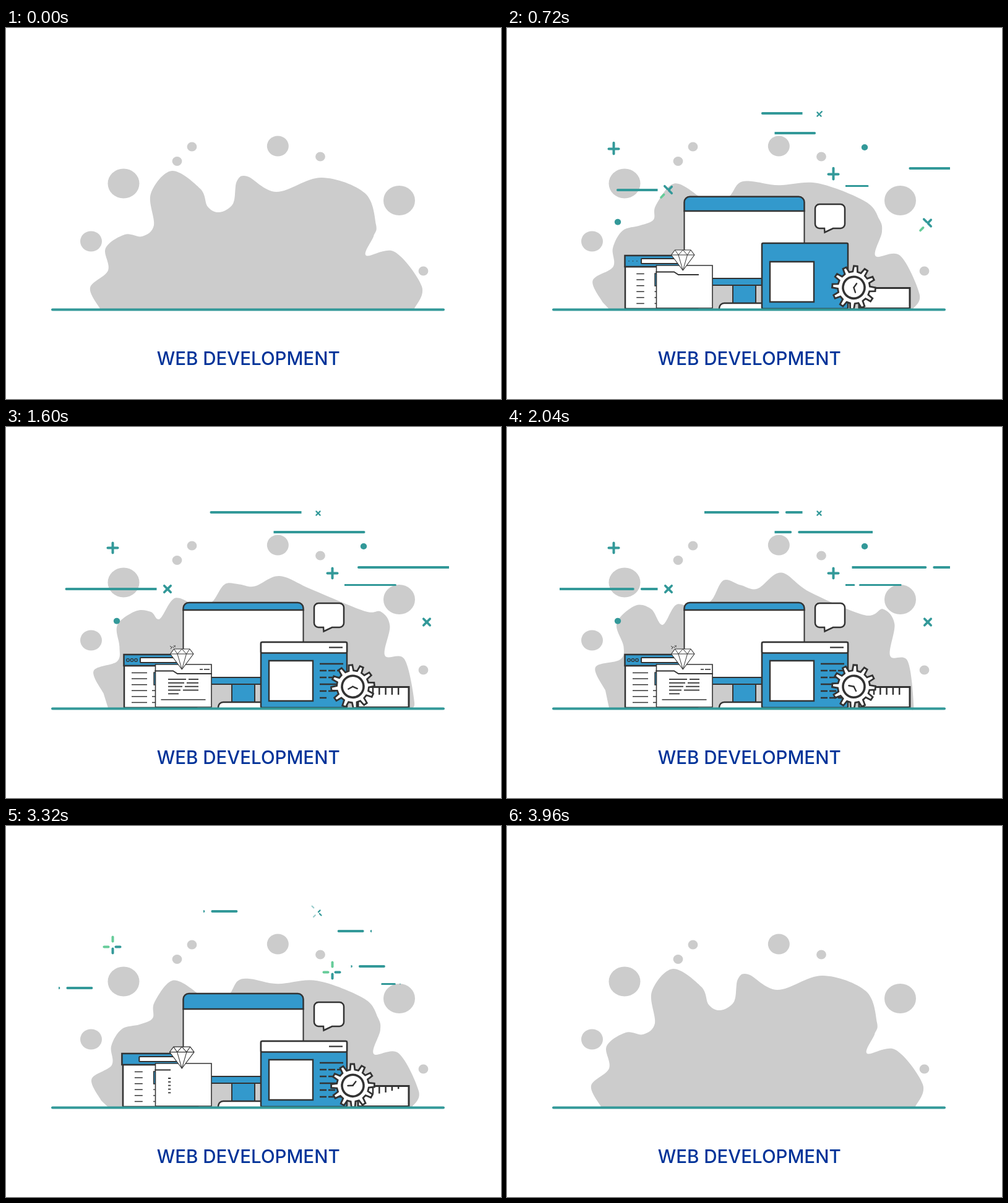
Animation of 800 by 600 pixels, one loop 4 s. Source, as an HTML page with a canvas:

```html
<!DOCTYPE html>
<html lang="en">
<head>
<meta charset="utf-8">
<title>Web development</title>
<style>
  html, body { margin: 0; width: 100%; height: 100%; overflow: hidden; background: #fff; }
  canvas, svg { position: absolute; left: 0; top: 0; display: block; }
  text { font: 500 29.5px Inter, Arial, sans-serif; fill: #039; text-anchor: middle; }
</style>
</head>
<body>
<canvas id="stage" width="800" height="600"></canvas>
<svg width="800" height="600"><text x="391.7" y="544.5">WEB DEVELOPMENT</text></svg>
<script>
const LOOP = 4000, STEP = 40, GROUND = 454.5;
const GRAY = '#ccc', BLUE = '#39c', DARK = '#333', TEAL = '#399', WHITE = '#fff';
const ctx = document.getElementById('stage').getContext('2d');
let t = 0;

// Timing: each part grows after its start and shrinks the same way before its end.
const clamp = u => Math.max(0, Math.min(1, u));
const mix = (a, b, u) => a + (b - a) * u;
const life = (start, end, time = 300) => clamp(Math.min(t - start, end - t) / time);
const pop = (start, end, spring = 1.7) => {
  const v = life(start, end) - 1;
  return 1 + (spring + 1) * v ** 3 + spring * v * v;
};
const reveal = (start, end, time = 200) => {
  const u = life(start, end, time);
  return u * u * (3 - 2 * u);
};

function placed(x, y, sx, sy, degrees, draw) {
  if (sx <= 0.01 || sy <= 0.01) return;
  ctx.save();
  ctx.translate(x, y);
  ctx.rotate(degrees * Math.PI / 180);
  ctx.scale(sx, sy);
  ctx.translate(-x, -y);
  draw();
  ctx.restore();
}

function clipped(x, y, w, h, draw) {
  ctx.save();
  ctx.beginPath();
  ctx.rect(x, y, w, h);
  ctx.clip();
  draw();
  ctx.restore();
}

const aboveGround = draw => clipped(0, 0, 800, GROUND, draw);

function paint(fill, width, stroke = DARK) {
  if (fill) { ctx.fillStyle = fill; ctx.fill(); }
  if (width) { ctx.strokeStyle = stroke; ctx.lineWidth = width; ctx.stroke(); }
}

function box(x, y, w, h, r, fill, width = 2.5) {
  if (h <= 0) return;
  ctx.beginPath();
  ctx.roundRect(x, y, w, h, r);
  paint(fill, width);
}

function oval(x, y, r, fill, width, squash = 1) {
  ctx.beginPath();
  ctx.ellipse(x, y, r, r * squash, 0, 0, 7);
  paint(fill, width);
}

function poly(points, fill, width, close = true) {
  ctx.beginPath();
  points.forEach(([x, y]) => ctx.lineTo(x, y));
  if (close) ctx.closePath();
  paint(fill, width);
}

function line(x1, y1, x2, y2, width, color = DARK, cap = 'butt') {
  ctx.lineCap = cap;
  ctx.beginPath();
  ctx.moveTo(x1, y1);
  ctx.lineTo(x2, y2);
  paint(null, width, color);
}

// Key points of the outline: x, y at rest, then x, y at full swell.
const SPLASH = [
  [152, 454, 159, 425], [136, 420, 143, 388], [165, 392, 183, 376], [161, 356, 189, 355],
  [192, 334, 177, 317], [220, 337, 207, 288], [239, 319, 233, 294], [234, 268, 252, 321],
  [268, 231, 275, 288], [314, 260, 310, 300], [326, 289, 320, 290], [345, 298, 333, 276],
  [367, 284, 350, 247], [373, 248, 378, 256], [390, 240, 405, 262], [437, 265, 443, 235],
  [510, 242, 488, 267], [580, 267, 578, 305], [598, 318, 608, 294], [594, 337, 627, 318],
  [582, 368, 620, 370], [628, 362, 648, 379], [672, 418, 657, 452], [660, 454, 650, 454]
];

function drawSplash() {
  const swell = t < 2000 ? t / 2000 : clamp((3960 - t) / 1960);
  const points = SPLASH.map(([ax, ay, bx, by]) => [mix(ax, bx, swell), mix(ay, by, swell)]);
  const pick = i => points[Math.max(0, Math.min(points.length - 1, i))];
  ctx.beginPath();
  ctx.moveTo(165, GROUND);
  ctx.lineTo(...points[0]);
  for (let i = 0; i < points.length - 1; i++) {
    const [a, b, c, d] = [pick(i - 1), pick(i), pick(i + 1), pick(i + 2)];
    ctx.bezierCurveTo(b[0] + (c[0] - a[0]) / 6, b[1] + (c[1] - a[1]) / 6,
      c[0] - (d[0] - b[0]) / 6, c[1] - (d[1] - b[1]) / 6, c[0], c[1]);
  }
  paint(GRAY);
  const bubbles = (r, ...centers) => centers.forEach(([x, y]) => oval(x, y, r, GRAY, 0, .94));
  bubbles(25.5, [190, 251.5], [635.5, 279]);
  bubbles(17.5, [137.5, 345], [439.3, 191]);
  bubbles(7.9, [276.5, 215.5], [300.5, 192], [508, 208], [674.5, 393]);
}

// Two dashes travel away from the anchor through a fixed window.
function streak(x, y, dir, scale = 1) {
  const span = 158.5 * scale, head = .0925 * t;
  const dash = (from, to) => {
    const a = (head - from) * scale - 2, b = (head - to) * scale + 2;
    if (a > 0) line(x + dir * a, y, x + dir * b, y, 4 * Math.sqrt(scale), TEAL, 'round');
  };
  clipped(dir > 0 ? x : x - span, y - 5, span, 10, () => {
    dash(0, 151);
    dash(161, 204);
  });
}

const armColor = d => d < 6 ? TEAL : d < 11 ? '#6c9' : d < 28 ? '#9cc' : '#cff';

// Four arms fly in one by one, rest as a cross, then part again.
function cross(x, y, size, turn, order, { first, speed, last, lag, exitSpeed }) {
  order.forEach((rank, i) => {
    const d = Math.max(0, (first + 110 * rank - t) * speed, (t - last - lag * rank) * exitSpeed);
    if (t < 100 || d > 46) return;
    placed(x, y, size, size, turn + i * 90, () =>
      line(x, y - d - 1, x, y - d - 8, 4, armColor(d), 'round'));
  });
}

function drawDecor() {
  streak(477.5, 138, -1);
  streak(432.5, 170, 1);
  streak(716, 227, -1);
  streak(243.5, 262, -1);
  streak(547, 255.5, 1, .57);

  const plus = { first: 430, speed: .045, last: 3300, lag: -20, exitSpeed: .1 };
  const saltire = { first: 520, speed: .08, last: 2620, lag: 40, exitSpeed: .08 };
  const spark = { first: 430, speed: .08, last: 3100, lag: 80, exitSpeed: .08 };
  cross(172.5, 195.5, 1, 0, [3, 1, 0, 2], plus);
  cross(527.5, 236.5, 1, 0, [3, 1, 0, 2], plus);
  cross(261, 262, .92, -45, [2, 1, 0, 3], saltire);
  cross(680, 315.5, .92, -45, [2, 1, 0, 3], saltire);
  cross(504.5, 139.5, .55, -45, [0, 3, 2, 1], spark);

  const r = 5.2 * pop(250, LOOP * 2, 17) * reveal(0, 2760, 160);
  const color = r > 9 ? '#9cc' : r > 4 ? TEAL : '#bbb';
  if (r > 0) {
    oval(578, 193, r, color, 0, .96);
    oval(179, 313.7, r, color, 0, .96);
  }
}

function drawSitePage() {
  const wide = Math.max(1, pop(200, 3570));
  const tall = reveal(80, 3640, 160);
  placed(249, 454, wide, tall, 0, () => {
    box(191, 386, 117, 68, 0, WHITE);
    placed(249, 377, Math.sqrt(wide), 1, 0, () => {
      box(190.5, 368, 118, 18, 0, BLUE);
      box(217, 373, 82, 8, 1, WHITE, 2);
    });
    box(239, 397, 22, 20, 0, BLUE, 1.5);
    const dot = 2.3 * reveal(700, 3240);
    for (let i = 0; dot > 0 && i < 3; i++) oval(197 + i * 6.5, 377, dot, null, 1.3);
    const half = 12.5 * reveal(600, 3440, 240);
    for (let i = 0; half > 0 && i < 6; i++) {
      const y = 397.5 + i * 9.6;
      line(215.5 - half, y, 215.5 + half, y, 1.5);
      if (i > 2) line(241 - half / 2.5, y, 241, y, 1.5);
    }
  });
}

function drawMonitor() {
  const foot = pop(200, 3800);
  aboveGround(() => {
    const top = mix(454, 413, reveal(80, 3800));
    box(365, top, 37, 445 - top, 0, BLUE, 2);
    placed(383, 454, foot, clamp(foot), 0, () => box(343, 445, 81, 20, 8, WHITE));
  });
  const screen = mix(414, 296, reveal(280, 3680, 150));
  const settle = reveal(360, 3560, 160);
  const chin = mix(Math.min(414, screen + 4), 405, settle);
  if (screen < 413) {
    box(286.5, screen, 194, chin - screen, 0, WHITE, 2);
    box(286.5, chin, 194, mix(413, 416, settle) - chin, 0, BLUE, 2);
  }
  const head = 12 * pop(560, 3440, 9);
  if (head > 1) box(286.5, 296 - head, 194, head, [9, 9, 0, 0], BLUE);
}

function drawFolder() {
  const size = pop(271, 3680);
  placed(286.5, 418.5, size, size, -45 * (1 - life(271, 3680)), () => {
    box(241.5, 384, 90.5, 69, 0, WHITE, 1.6);
    const tab = 94 * reveal(560, 3400, 240);
    if (tab > 0) {
      ctx.setLineDash([tab, 200]);
      poly([[241, 394.5], [270, 394.5], [277, 399], [332, 399]], null, 1.8, false);
      ctx.setLineDash([]);
    }
    if (life(800, 3200)) {
      line(313, 392, 318, 392, 1.6);
      line(320, 392, 329, 392, 1.6);
    }
    clipped(261, 404, 51 * reveal(800, 3360), 32, () => {
      for (let i = 0; i < 5; i++) {
        const y = 408 + i * 5.85, cut = 272 + (i * 37 + 19) % 20;
        line(262, y, cut, y, 1.8);
        if (i < 4) line(cut + 4, y, 311, y, 1.8);
      }
    });
    const rule = 72 * reveal(1040, 2860, 320);
    if (rule > 0) line(250.5, 441, 250.5 + rule, 441, 1.6);
  });
}

function drawDiamond() {
  const size = pop(200, 3570, 2.6);
  placed(284.3, 392, size, size, 0, () => {
    ctx.lineJoin = 'round';
    poly([[271.5, 359], [297, 359], [303, 367], [284.3, 392], [265.5, 367]], WHITE, 1.1);
    line(265.5, 367, 303, 367, 1);
    poly([[271.5, 359], [277, 367], [284.3, 359], [291.5, 367], [297, 359]], null, 1, false);
    poly([[277, 367], [284.3, 392], [291.5, 367]], null, 1, false);
    ctx.lineJoin = 'miter';
  });
  if (life(900, 3160)) {
    line(265, 354, 268, 357, 1);
    line(266, 359, 269, 355, 1);
    line(270, 357, 274, 353, 1);
    line(271, 353, 274, 356, 1);
  }
}

function drawSpeech() {
  const size = pop(200, 3640, 2.2) + .06 * reveal(2600, 2760, 80);
  placed(513, 331, size, size, 0, () => {
    ctx.beginPath();
    ctx.moveTo(505, 285);
    ctx.arcTo(546, 285, 546, 324, 7);
    ctx.arcTo(546, 324, 530, 324, 7);
    ctx.lineTo(527, 324);
    ctx.lineTo(513.5, 330.5);
    ctx.lineTo(513, 324);
    ctx.arcTo(498, 324, 498, 290, 7);
    ctx.arcTo(498, 285, 510, 285, 7);
    ctx.closePath();
    paint(WHITE, 2.5);
  });
}

function drawRuler() {
  const wide = Math.max(1, pop(200, 3640, 2.6));
  placed(610, 454, wide, reveal(160, 3720), 0, () => {
    box(569, 420.5, 82, 33, 0, WHITE, 3);
    for (let i = 0; i < 5; i++) {
      const x = 593 + i * 10.3, tick = 12 * reveal(900 + 60 * i, 3640 - 50 * i, 300);
      if (tick > 0) line(x, 421, x, 421 + tick, 2.5);
    }
  });
}

function drawApp() {
  const size = pop(265, 3740), turn = -30 * (1 - life(265, 3740));
  placed(481, 401, size, size, turn, () => {
    box(412, 348, 139, 106, 2, BLUE);
    const pane = pop(316, 3690), pale = !life(440, 3500);
    placed(460.5, 410.5, pane, pane, 0, () =>
      box(425, 378, 71, 65, 0, pale ? '#9cf' : WHITE, pale ? 1.4 : 2.4));
    for (let i = 0; i < 6; i++) {
      const y = 383 + i * 11;
      clipped(507, y - 2, 38 * reveal(1220 + 60 * i, 3540), 4, () => {
        ctx.setLineDash(i % 3 ? [11, 3] : []);
        line(507, y, 545, y, 2.4);
        ctx.setLineDash([]);
      });
    }
    const bar = pop(940, 3640);
    placed(481.5, 357, bar, bar, 0, () => {
      box(412, 348, 139, 17.5, 2, WHITE);
      line(522, 356.5, 544, 356.5, 2.2);
    });
  });
}

function drawGear() {
  const size = pop(200, 3660), x = 560.5, y = 419.8, teeth = 12;
  aboveGround(() => placed(x, y, size, size, t * .09, () => {
    const rim = [];
    for (let i = 0; i < teeth; i++) {
      [[-8.5, 26], [-4.7, 35], [4.7, 35], [8.5, 26]].forEach(([shift, r]) => {
        const a = (i * 360 / teeth + shift) * Math.PI / 180;
        rim.push([x + r * Math.sin(a), y - r * Math.cos(a)]);
      });
    }
    poly(rim, WHITE, 2.8);
    oval(x, y, 17.5, WHITE, 3.6);
    placed(x, y, 1, 1, -30, () => {
      line(x, y, x, y - 8, 2.4, DARK, 'round');
      line(x, y, x + 6.5, y + 5, 2.4, DARK, 'round');
    });
  }));
}

function frame() {
  t = Math.floor(performance.now() % LOOP / STEP) * STEP;
  ctx.fillStyle = WHITE;
  ctx.fillRect(0, 0, 800, 600);
  [drawSplash, drawDecor, drawSitePage, drawMonitor, drawFolder, drawDiamond,
    drawSpeech, drawRuler, drawApp, drawGear].forEach(draw => draw());
  line(75, 455.5, 707, 455.5, 4, TEAL, 'round');
  requestAnimationFrame(frame);
}
frame();
</script>
</body>
</html>
```
